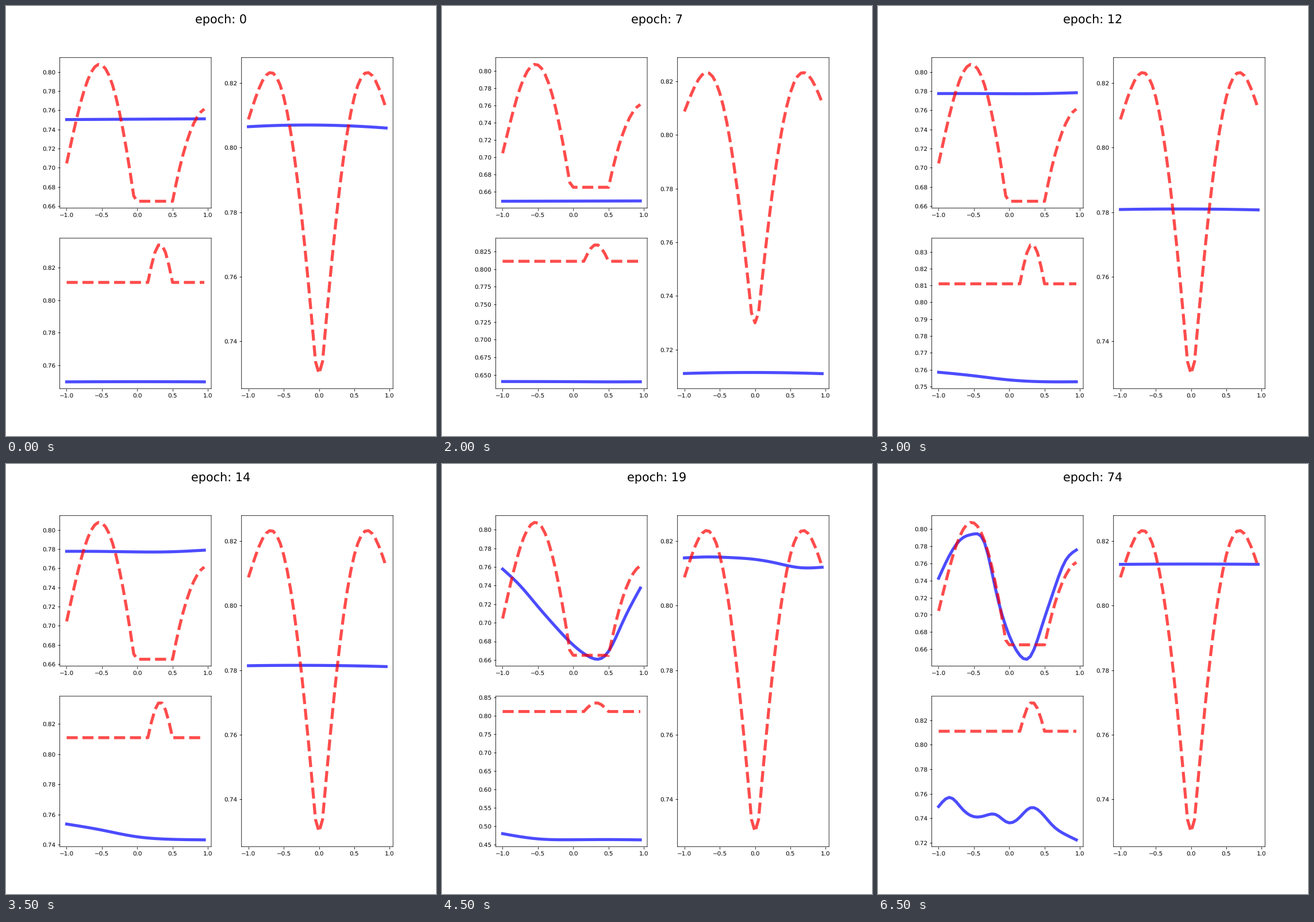
A matplotlib script for the animation above (7 s loop, 748x748 px).

```python
import numpy as np
import matplotlib.pyplot as plt
from matplotlib.animation import FuncAnimation

plt.rcParams.update({"path.snap": False, "text.hinting": "none"})

X = np.round(-1 + 0.05 * np.arange(40), 2)


def curve(*y):
    """Natural cubic spline through evenly spaced heights, sampled at X."""
    y, n = np.array(y), len(y)
    second = np.zeros(n)
    bands = 4 * np.eye(n - 2) + np.eye(n - 2, k=1) + np.eye(n - 2, k=-1)
    second[1:-1] = np.linalg.solve(bands, 6 * np.diff(y, 2))
    s = (X - X[0]) / (X[-1] - X[0]) * (n - 1)
    k = np.minimum(s.astype(int), n - 2)
    b = s - k
    a = 1 - b
    return (a * y[k] + b * y[k + 1]
            + ((a**3 - a) * second[k] + (b**3 - b) * second[k + 1]) / 6)


def parabola(c, b=0.0, a=0.0):
    return c + b * X + a * X**2


def hill(x, center, top, a, b, c):
    d = x - center
    return top - d**2 * (a + b * d + c * d**2)


# Dashed targets: smooth hills clipped at a floor
hump = hill(X, -0.535, 0.808, 0.625, 0.12, -0.42)
t = X - 0.5
rise = 0.665 + 0.385 * t - 0.38 * t**2
bump = 0.811 + 0.0236 * np.sin(np.pi * (X - 0.15) / 0.35)
valley = hill(np.abs(X), 0.683, 0.8233, 0.207, -0.14, -0.18)
TARGETS = [
    np.maximum(np.where(X < 0.25, hump, rise), 0.665),
    np.where(np.abs(X - 0.325) < 0.18, np.maximum(bump, 0.811), 0.811),
    np.maximum(valley, 0.73),
]

# Network outputs at key epochs: top left, bottom left, right
STAGES = {
    0: [parabola(.7507, .0004), parabola(.7499, 0, -.0001),
        parabola(.807, -.00025, -.00075)],
    2: [parabola(.5437, .0001), parabola(.5404, 0, -.0001),
        parabola(.655, -.0001, -.0006)],
    9: [parabola(.7775, .0003),
        curve(.7634, .7632, .7628, .7623, .7626),
        parabola(.7805, 0, -.0002)],
    14: [curve(.7777, .7776, .7771, .7772, .7789),
         curve(.7536, .7497, .7453, .7435, .7431),
         parabola(.7815, -.00015, -.00025)],
    19: [curve(.7577, .7402, .7185, .6973, .6778, .6637, .6655, .7017, .7373),
         curve(.4797, .4658, .4632, .4637, .4629),
         curve(.8148, .8151, .8149, .8144, .8132, .8118, .8119)],
    24: [curve(.6876, .6779, .6623, .6365, .6230, .6207, .6205, .6375, .652),
         curve(.636, .633, .6243, .6205, .6226, .6278, .6304),
         curve(.8154, .816, .816, .8157, .8153, .8148, .815)],
    74: [curve(.7427, .7708, .7889, .7942, .7843, .7275, .681, .654, .6515,
               .687, .727, .762, .7757),
         curve(.7496, .757, .7482, .7415, .742, .743, .7366, .7402, .7486,
               .744, .7335, .727, .7224),
         parabola(.8129, 0, -.0001)],
}
# How far training has moved between the two neighbouring stages
BLEND = {1: .35, 4: .2, 7: .45, 12: .5, 17: .5, 22: .35, 49: .88}
EPOCHS = sorted([*STAGES, *BLEND])


def outputs(epoch):
    if epoch in STAGES:
        return STAGES[epoch]
    before = STAGES[max(e for e in STAGES if e < epoch)]
    after = STAGES[min(e for e in STAGES if e > epoch)]
    w = BLEND[epoch]
    return [(1 - w) * p + w * q for p, q in zip(before, after)]


fig = plt.figure(figsize=(10, 10), dpi=74.8)
axes = [fig.add_subplot(2, 2, 1), fig.add_subplot(2, 2, 3),
        fig.add_subplot(1, 2, 2)]
title = fig.suptitle("", fontsize=20)


def draw(i):
    epoch = EPOCHS[i]
    title.set_text(f"epoch: {epoch}")
    for ax, out, target in zip(axes, outputs(epoch), TARGETS):
        ax.clear()
        ax.plot(X, out, "b-", lw=5, alpha=0.7)
        ax.plot(X, target, "r--", lw=5, alpha=0.7)


anim = FuncAnimation(fig, draw, frames=len(EPOCHS), interval=500,
                     init_func=lambda: draw(0), repeat=True)
plt.show()
```
